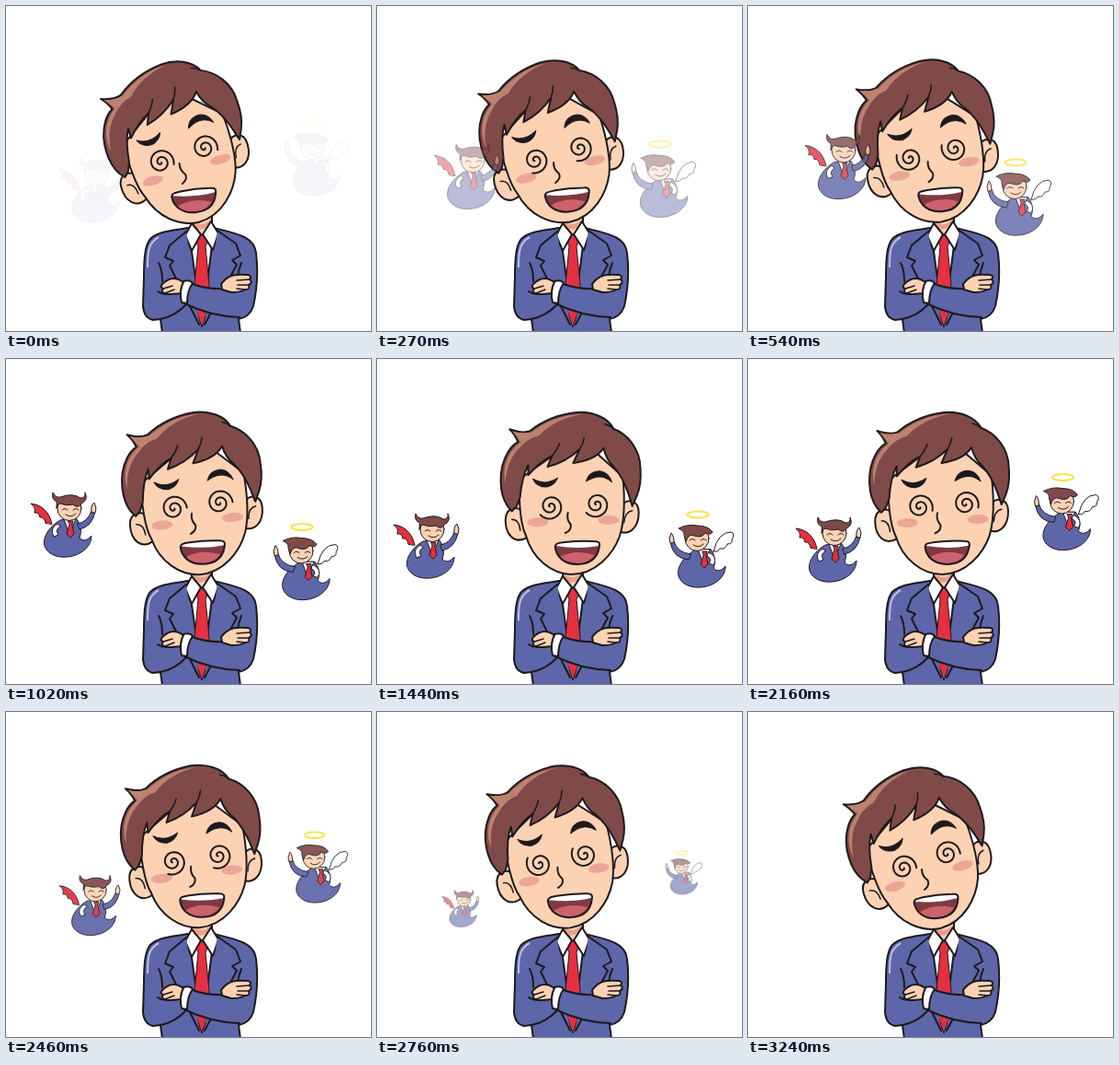
An HTML page that plays this animation: 397 px wide and 353 px high, repeating every 3.27 s.

```html
<!DOCTYPE html>
<html lang="en">
<head>
<meta charset="utf-8">
<title>Torn between two advisers</title>
<style>
  html, body { margin: 0; width: 100%; height: 100%; overflow: hidden; background: #fff; }
  svg { display: block; width: 397px; height: 353px; }
  .ink { stroke: #1d1a1c; stroke-width: 2; stroke-linejoin: round; stroke-linecap: round; }
  .thin { stroke: #1d1a1c; stroke-width: 1; stroke-linejoin: round; stroke-linecap: round; }
  .skin { fill: #fcd2b3; }
  .suit { fill: #5d66a9; }
  .hair { fill: #804a49; }
  .red { fill: #e62f41; }
  .white { fill: #fff; }
  .none { fill: none; }
</style>
</head>
<body>
<svg viewBox="0 0 397 353">
  <defs>
    <g id="torso">
      <path class="suit thin" d="M-10 13C-19 18-30 30-27 41C-24 50-13 54-3 53C12 52 24 42 24 30C19 36 14 36 11 32C14 25 12 17 8 12Z"/>
      <path class="white thin" d="M-6 12L0 28L7 12Z"/>
      <path class="red thin" d="M-1 14L4 14L3 18L5 28L1 32L-3 28L0 18Z"/>
    </g>
    <g id="face">
      <ellipse class="skin thin" rx="13" ry="13.5"/>
      <path class="none thin" d="M-8 2Q-5-1-2 2M4 2Q7-1 10 2M-4 7Q2 11 7 6"/>
    </g>
  </defs>

  <g id="body">
    <path class="suit ink" d="M198 241C182 244 166 244 157 253C151 260 150 275 150 295L149 326Q150 339 160 341L168 340L170 355H255L253 340Q265 338 269 326C273 308 274 285 272 268C270 250 250 247 226 241Z"/>
    <path d="M154 284C154 266 155 257 166 251" class="none" stroke="#b9c0e6" stroke-width="2"/>
    <path class="white ink" d="M199 245L213 346L226 245Z"/>
    <path class="skin ink" d="M202 226V242L212 250L224 242V226Z"/>
    <path d="M203 233Q214 242 223 231V236Q214 247 203 240Z" fill="#e8a18a"/>
    <path class="red ink" style="stroke-width:1" d="M208 249H217L219 256L217 261L221 303L219 331L213 349L207 331L205 303L209 261L207 256Z"/>
    <path class="white ink" d="M202 236L195 249L202 266L212 248ZM223 234L231 247L225 265L214 248Z"/>
    <path class="suit ink" d="M196 245L178 260L173 273L182 277L178 282L210 346M230 244L250 258L255 271L246 276L251 281L216 346"/>
    <path class="none ink" d="M166 279Q170 286 170 299M256 279Q253 286 252 294M168 340Q184 337 196 324"/>
    <path class="suit" d="M197 299Q218 306 240 309L268 316Q269 336 252 338Q222 336 194 323Z"/>
    <path class="none ink" d="M194 323Q222 337 254 338M203 302Q218 308 240 307M165 310Q170 314 178 312"/>
    <path class="white ink" d="M193 299Q200 297 203 301Q197 309 197 323L191 322Q188 309 193 299Z"/>
    <path class="skin ink" d="M193 300C185 294 177 295 170 302Q167 306 171 307Q168 311 173 312Q174 314 190 312Q190 305 193 300Z"/>
    <path class="none ink" style="stroke-width:1.5" d="M171 307L181 304M173 312L183 308"/>
    <path class="skin ink" d="M234 302C242 291 251 291 263 292Q268 293 265 297Q269 300 264 303Q266 308 260 308Q255 311 245 311L235 308Z"/>
    <path class="none ink" style="stroke-width:1.5" d="M265 297L251 298M264 303L252 303M260 308L251 307"/>
  </g>

  <g id="head">
    <path class="skin ink" d="M161 168C154 158 140 160 140 175C140 191 150 201 163 194ZM266 160C272 151 285 153 285 167C285 183 275 193 262 187Z"/>
    <path class="none ink" style="stroke-width:1.5" d="M147 174Q155 174 156 186M278 165Q270 166 269 178"/>
    <path class="skin ink" d="M156 130C154 150 156 179 162 191C169 217 190 233 211 234C238 234 257 212 264 193C269 178 270 152 268 128L220 85Z"/>
    <path class="hair ink" d="M147 165L142 159C134 147 131 121 143 101Q148 93 154 90C152 85 149 80 145 76C156 80 162 80 167 78C182 66 198 60 218 58C236 57 252 64 258 76C273 82 287 98 287 119C288 132 286 142 283 149L278 160L274 147C270 135 264 124 258 117Q250 110 247 97Q238 110 214 113L221 98Q206 112 186 117L191 105Q178 111 165 126L165 115Q158 128 156 150L152 160Z"/>
    <path d="M148 78C156 81 164 80 169 79C184 68 202 60 224 60C204 63 188 71 177 83C167 85 160 91 156 96C146 105 141 119 140 135C136 112 146 98 157 90Z" fill="#bb8270"/>
    <path class="none ink" style="stroke-width:1.6" d="M221 98Q225 92 226 86M191 105Q197 98 199 92M258 76Q254 72 249 71"/>
    <ellipse cx="175" cy="177" rx="11.5" ry="5" fill="#eba697"/>
    <ellipse cx="252" cy="175" rx="11.5" ry="5" fill="#eba697"/>
    <path class="ink" style="stroke-width:1" fill="#1d1a1c" d="M170 130Q183 138 197 129Q194 137 185 139Q174 139 170 130ZM228 133Q231 122 243 122Q252 123 256 134Q244 123 228 133Z"/>
    <path class="none ink" d="M208 167Q206 174 211 180Q212 186 205 189"/>
    <path class="none ink eye"/>
    <path class="none ink eye"/>
    <g id="mouth">
      <path id="lips" d="M194 204C194 200 198 200 204 199Q220 197 236 198C242 198 243 200 242 204C240 217 231 223 218 223C204 223 195 215 194 204Z" fill="#7f3a40"/>
      <path d="M199 215Q216 206 237 213Q230 222 218 222Q206 222 199 215Z" fill="#cd626d"/>
      <path class="white" d="M195 203C196 200 199 200 204 199Q220 197 236 198C241 198 242 200 241 203Q220 207 195 203Z"/>
      <use href="#lips" class="ink" fill-opacity="0"/>
    </g>
  </g>

  <g id="devil"><g transform="translate(7 -18)">
    <path class="red thin" d="M-19 17C-22 3-31-4-42-5Q-36-1-38 5Q-33 4-32 10Q-27 9-26 16Z"/>
    <use href="#torso"/>
    <path class="suit thin" d="M9 17Q20 15 24 3L28 4Q25 20 11 23Z"/>
    <path class="skin thin" d="M24 4Q23-3 27-6L29 0L28 5Z"/>
    <path class="white thin" d="M-13 17Q-22 22-17 31L-12 29Q-16 23-10 20Z"/>
    <use href="#face"/>
    <path class="hair thin" d="M-14-7Q-20-10-18-17Q-15-11-10-12Q4-17 12-11Q18-11 17-17Q21-9 13-5Q10 1 4-4Q-3-2-10-5Q-13-5-14 0Z"/>
  </g></g>

  <g id="angel"><g transform="translate(-1 -11)">
    <ellipse class="none" cx="1" cy="-26" rx="11.5" ry="3.5" stroke="#f8e34a" stroke-width="2"/>
    <path class="white thin" d="M18 14Q23-7 37-7Q42-5 38 1Q39 6 33 6Q31 12 25 11Q23 15 18 14Z"/>
    <use href="#torso" x="7"/>
    <path class="suit thin" d="M-7 17Q-22 15-25 3L-29 4Q-26 22-9 23Z"/>
    <path class="skin thin" d="M-25 4Q-25-3-28-6L-30 0L-29 5Z"/>
    <path class="white thin" d="M13 15Q23 20 18 29L13 27Q17 22 11 19Z"/>
    <use href="#face"/>
    <path class="hair thin" d="M-14-4Q-13-8-20-11Q-10-16 0-14Q12-14 17-7Q14-3 9-6Q5 0-3-3Q-9-6-12 3Z"/>
  </g></g>
</svg>
<script>
const LOOP = 3270;
const $ = id => document.getElementById(id);
const eyes = [...document.querySelectorAll('.eye')];
const centres = [[189, 160], [239, 158]];

// Each row: time, x, y
const devilPath = [[0, 92, 200], [540, 97, 174.5], [1020, 62, 180], [1290, 50.5, 195], [1440, 53, 203], [1650, 59, 208], [2160, 87, 207], [2760, 90.5, 213.5], [LOOP, 91, 216]];
const angelPath = [[0, 334, 164], [540, 291, 207], [1020, 322, 219.5], [1440, 349, 206], [1770, 361, 186], [2160, 342.5, 165.5], [2760, 331.5, 174], [LOOP, 328, 178]];

const clamp = v => Math.max(0, Math.min(1, v));

// Smooth curve through unevenly timed points
function along(keys, t, axis) {
  let i = 0;
  while (i < keys.length - 2 && t > keys[i + 1][0]) i++;
  const slope = n => {
    const a = keys[Math.max(0, n - 1)], b = keys[Math.min(keys.length - 1, n + 1)];
    return (b[axis] - a[axis]) / (b[0] - a[0]);
  };
  const a = keys[i], b = keys[i + 1], span = b[0] - a[0], u = (t - a[0]) / span, v = 1 - u;
  return a[axis] * (1 + 2 * u) * v * v + b[axis] * u * u * (3 - 2 * u)
    + span * u * v * (slope(i) * v - slope(i + 1) * u);
}

function spiral() {
  let d = '';
  const end = Math.PI * 4.2;
  for (let a = 0.8; a < end; a += 0.2) {
    const r = 14.5 * a / end;
    d += (d ? 'L' : 'M') + (r * Math.cos(a)).toFixed(1) + ' ' + (r * Math.sin(a)).toFixed(1);
  }
  return d;
}

function place(id, path, t, scale, alpha) {
  $(id).setAttribute('transform', `translate(${along(path, t, 1)} ${along(path, t, 2)}) scale(${scale})`);
  $(id).setAttribute('opacity', alpha);
}

function draw(t) {
  const peak = 1775;
  const tilt = t < peak ? -16 + 19.4 * t / peak : 3.4 - 19.4 * (t - peak) / (LOOP - peak);
  $('head').setAttribute('transform', `rotate(${tilt} 213 238)`);
  $('mouth').setAttribute('transform', `translate(${tilt * -0.05 + tilt * 0.4} 0) rotate(${-tilt * 0.7} 218 210)`);
  eyes.forEach((eye, i) =>
    eye.setAttribute('transform', `translate(${centres[i]}) rotate(${t / LOOP * 1080})`));

  const scale = clamp((3240 - t) / 840);
  const alpha = Math.min(clamp(0.05 + t / 720), scale);
  place('devil', devilPath, t, scale, alpha);
  place('angel', angelPath, t, scale, alpha);
}

eyes.forEach(eye => eye.setAttribute('d', spiral()));
const start = performance.now();
function tick() {
  draw((performance.now() - start) % LOOP);
  requestAnimationFrame(tick);
}
tick();
</script>
</body>
</html>
```
